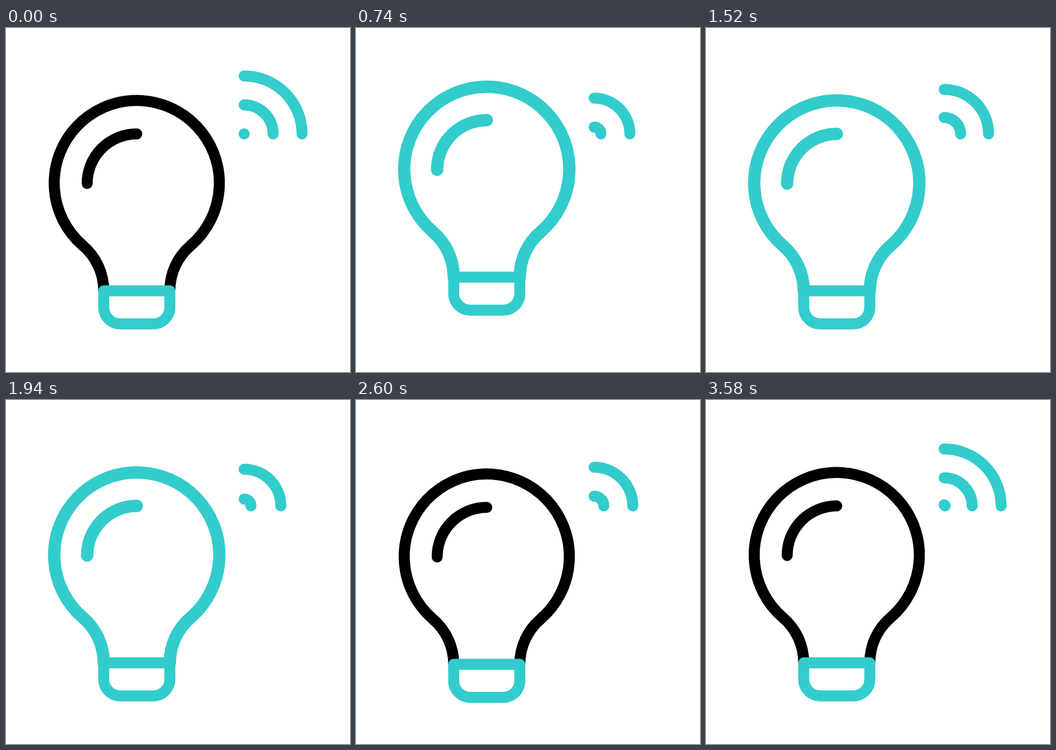
Write an HTML page that moves like this. It is 640 px wide and 640 px high and loops after 3.6 s.

```html
<!DOCTYPE html>
<html lang="en">
<head>
<meta charset="utf-8">
<title>Smart bulb</title>
<style>
  html, body { margin: 0; width: 100%; height: 100%; overflow: hidden; background: #fff; }
  svg { display: block; width: 100%; height: 100%; }
  path { fill: none; stroke-linecap: round; stroke-linejoin: round; }
  .teal { stroke: #3cc; }
  .thin { stroke-width: 20.5; }
  .wide { stroke-width: 23; }
  .ray { stroke-width: 22; }
</style>
</head>
<body>
<svg viewBox="0 0 640 640">
  <defs>
    <g id="glass">
      <path d="M181.8 489C181.8 457 168 426 143 404.8A153.6 153.6 0 1 1 343.6 404.8C318.6 426 304.8 457 304.8 489"/>
      <path d="M151 289.3A92.3 92.3 0 0 1 243.3 197"/>
    </g>
  </defs>
  <g id="bulb">
    <use id="dark" href="#glass" class="thin" stroke="#000"/>
    <use id="lit" href="#glass" class="teal wide"/>
    <path class="teal thin" d="M181.8 489H304.8V519.8A30.7 30.7 0 0 1 274.1 550.5H212.5A30.7 30.7 0 0 1 181.8 519.8Z"/>
  </g>
  <g id="rays"></g>
  <g id="waves"></g>
</svg>
<script>
const LOOP = 3600;
const WAVE_STEP = 600, WAVE_GAP = 53.85, WAVE_FADE = 110;
const births = [-1200, -600, 0, 600, 1180, 1800, 2400, 3000, 3560];

// near end, far end, time the ray grows from, full, starts to leave, gone
const rays = [
  { line: [113.5, 158.5, 92.5, 129], times: [340, 430, 490, 580] },
  { line: [154, 124, 139, 90.5], times: [340, 430, 490, 580] },
  { line: [390, 405.5, 411, 424], times: [2220, 2300, 2340, 2430] },
  { line: [358, 447, 375, 470.5], times: [2220, 2300, 2340, 2430] }
];

const ease = {
  line: x => x,
  out: x => 1 - (1 - x) * (1 - x),
  both: x => x * x * (3 - 2 * x)
};

// [time, value, easing into this value]
const lift = [
  [0, 0], [200, 12.8, 'both'], [720, -25.6, 'out'], [1070, -25.6],
  [1300, 12.8, 'both'], [1480, 0, 'both'], [2180, 0],
  [2460, 12.8, 'both'], [2660, 0, 'both']
];
const tilt = [
  [0, 0], [170, 0], [300, -2.85, 'both'], [460, 2.85, 'both'], [640, 0, 'both']
];
const glow = [[0, 0], [160, 0], [260, 1], [2420, 1], [2520, 0]];

const $ = id => document.getElementById(id);
const clamp = x => Math.min(1, Math.max(0, x));

function at(keys, t) {
  const i = keys.findIndex(k => k[0] > t);
  if (i < 0) return keys[keys.length - 1][1];
  const [t0, v0] = keys[i - 1], [t1, v1, kind = 'line'] = keys[i];
  return v0 + (v1 - v0) * ease[kind]((t - t0) / (t1 - t0));
}

function addPath(parent, cls) {
  const p = document.createElementNS('http://www.w3.org/2000/svg', 'path');
  p.setAttribute('class', cls);
  return parent.appendChild(p);
}

const wavePaths = births.map(() => addPath($('waves'), 'teal thin'));
const rayPaths = rays.map(() => addPath($('rays'), 'teal ray'));

function drawWave(path, age) {
  const gone = 2 * WAVE_STEP + WAVE_FADE;
  const shown = age >= 0 && age < gone;
  path.style.display = shown ? '' : 'none';
  if (!shown) return;
  const r = Math.max(0.01, age / WAVE_STEP * WAVE_GAP);
  path.setAttribute('d', `M443 ${197 - r}A${r} ${r} 0 0 1 ${443 + r} 197`);
  path.style.opacity = clamp((gone - age) / WAVE_FADE);
}

function drawRay(path, { line: [x0, y0, x1, y1], times: [a, b, c, d] }, t) {
  const shown = t > a && t < d;
  path.style.display = shown ? '' : 'none';
  if (!shown) return;
  const tail = clamp((t - c) / (d - c)), head = clamp((t - a) / (b - a));
  const point = u => `${x0 + (x1 - x0) * u} ${y0 + (y1 - y0) * u}`;
  path.setAttribute('d', `M${point(tail)}L${point(head)}`);
}

function draw(t) {
  $('bulb').setAttribute('transform',
    `translate(0 ${at(lift, t)}) rotate(${at(tilt, t)} 243.3 561)`);
  const lit = at(glow, t);
  $('lit').style.opacity = lit;
  $('dark').style.display = lit < 1 ? '' : 'none';
  births.forEach((born, i) => drawWave(wavePaths[i], t - born));
  rays.forEach((ray, i) => drawRay(rayPaths[i], ray, t));
}

const start = performance.now();
function tick() {
  draw((performance.now() - start) % LOOP);
  requestAnimationFrame(tick);
}
draw(0);
requestAnimationFrame(tick);
</script>
</body>
</html>
```
